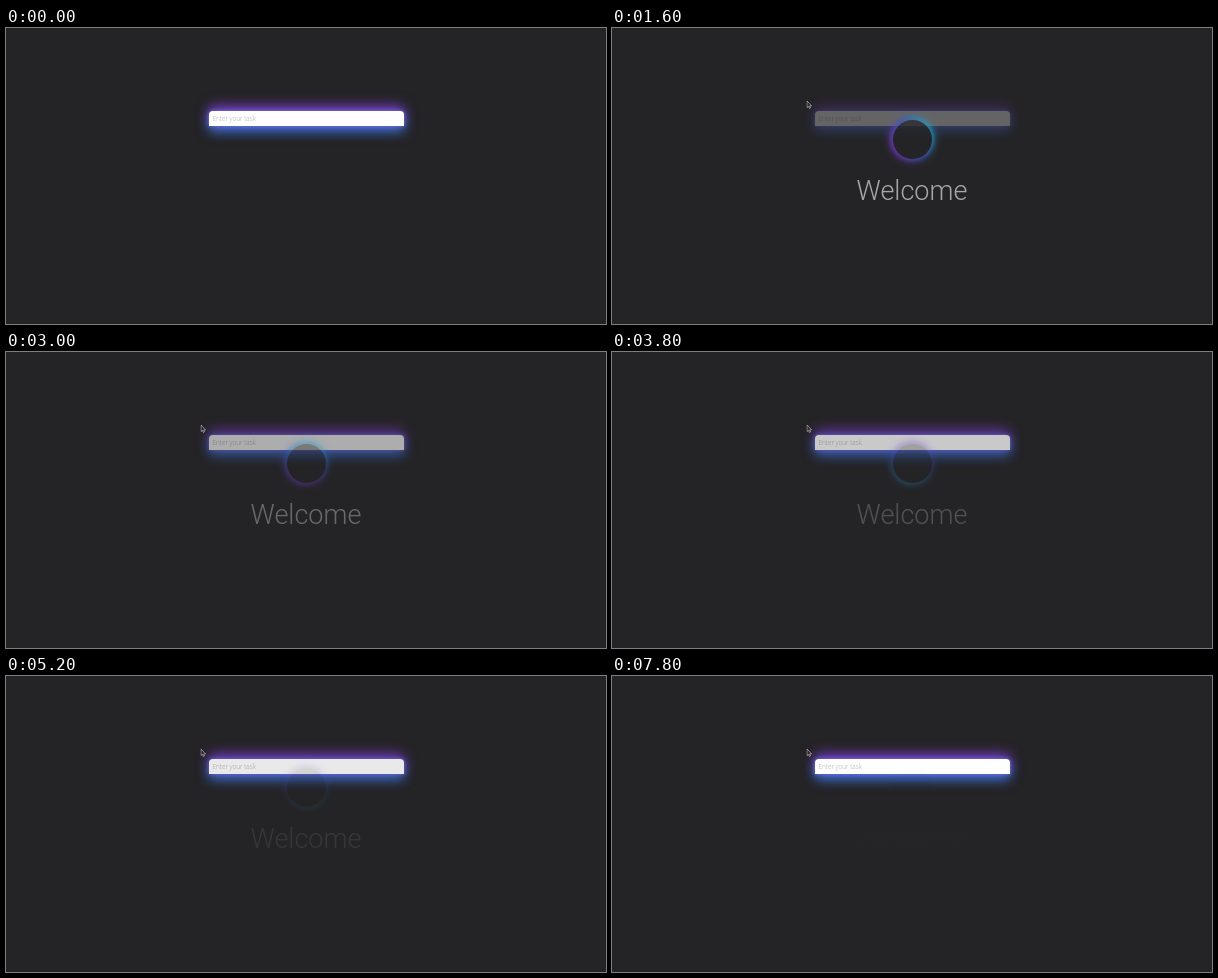
An HTML page that plays this animation: 600x296 px, repeating every 8000 ms.

```html
<!DOCTYPE html>
<html lang="en">
<head>
<meta charset="utf-8">
<title>Welcome</title>
<style>
  html, body { margin: 0; width: 100%; height: 100%; overflow: hidden; background: #242325; }
  body > * { position: absolute; }
  #task {
    left: 203px; top: 83px; width: 195px; height: 15px; box-sizing: border-box; padding-left: 3.5px;
    border-radius: 4px 4px 0 0; background: #fff; color: #aaa;
    font: 300 6.4px/15px "Open Sans", sans-serif;
    box-shadow: 0 0 4px #6f78f0, 0 -5px 13px #7a3cc8, 0 5px 13px #3f7fee;
  }
  #loader { inset: 0; }
  #loader > * { position: absolute; }
  #ring, #ring i { width: 44px; height: 44px; border-radius: 50%; }
  #ring { left: 278px; top: 89px; }
  #ring i { position: absolute; background: linear-gradient(#1fa5c4, #3b56c0 50%, #7a35c0); }
  #ring i:first-child { filter: blur(1.5px); }
  #ring i:last-child { filter: blur(5px); }
  #hole { left: 280.5px; top: 91.5px; width: 39px; height: 39px; border-radius: 50%; background: #242325; }
  #welcome {
    left: 200px; top: 147px; width: 200px; text-align: center; color: #dedede;
    font: 300 27px/32px Roboto, sans-serif;
  }
  #cursor { left: 0; top: 0; width: 7px; height: 10px; }
</style>
</head>
<body>
<div id="task">Enter your task</div>
<div id="loader">
  <div id="ring"><i></i><i></i></div>
  <div id="hole"></div>
  <div id="welcome">Welcome</div>
</div>
<svg id="cursor" viewBox="0 0 7 10">
  <path d="M.5 .5V7L2 5.8 3 8 4 7.5 3.1 5.4H5Z" fill="#222" stroke="#bbb" stroke-width=".7"/>
</svg>
<script>
const LOOP = 8000, STEP = 200, RELOAD = 400;
const [task, loader, ring, cursor] = ["task", "loader", "ring", "cursor"].map(id => document.getElementById(id));

// CSS "ease": cubic-bezier(.25, .1, .25, 1), solved by bisection
const bezier = (a, b, u) => 3 * a * u * (1 - u) ** 2 + 3 * b * u * u * (1 - u) + u ** 3;
function ease(x) {
  let low = 0, high = 1;
  for (let i = 0; i < 24; i++) {
    const mid = (low + high) / 2;
    if (bezier(.25, .25, mid) < x) low = mid; else high = mid;
  }
  return bezier(.1, 1, low);
}

function pointer(t) {
  if (t >= 1600) return [194.5, 72.5];
  const rest = Math.max(0, 1 - (t - RELOAD) / 600) ** 2;
  return [190 - 38 * rest, 70.5 - 12 * rest];
}

function draw(now) {
  const t = Math.floor(now % LOOP / STEP) * STEP;
  const loaded = t < RELOAD ? 1 : ease((t + 100) / 8500);
  const [x, y] = pointer(t);
  task.style.opacity = loaded;
  loader.style.opacity = 1 - loaded;
  ring.style.transform = `rotate(${(t - 1000) / STEP * 45 - 75}deg)`;
  cursor.style.visibility = t < RELOAD ? "hidden" : "visible";
  cursor.style.transform = `translate(${x}px, ${y}px)`;
  requestAnimationFrame(draw);
}
requestAnimationFrame(draw);
</script>
</body>
</html>
```
